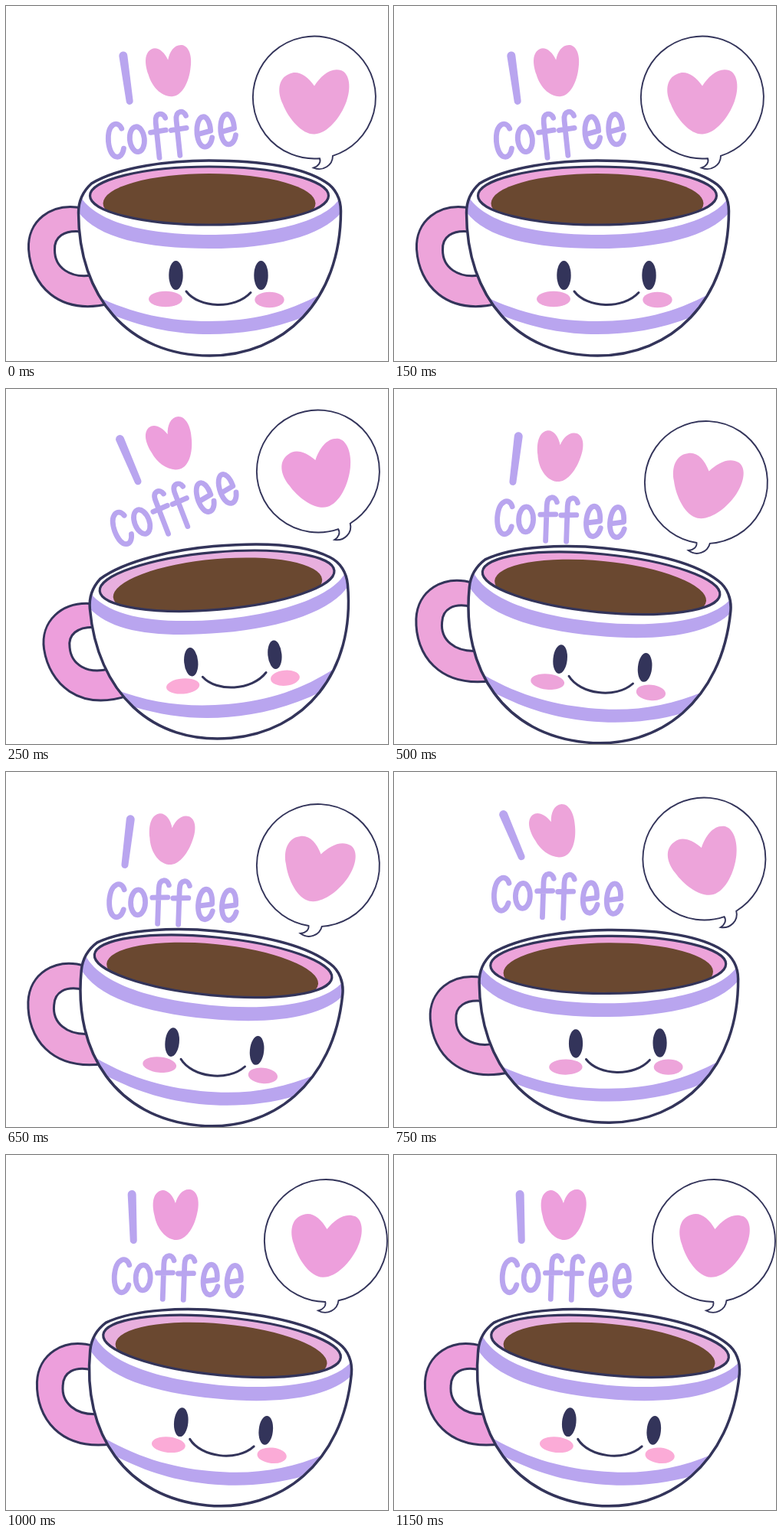
Write an HTML page that moves like this. It is 498 px wide and 464 px high and loops after 1250 ms.

```html
<!DOCTYPE html>
<html lang="en">
<head>
<meta charset="utf-8">
<title>I love coffee</title>
<style>
  html, body { margin: 0; width: 100%; height: 100%; overflow: hidden; background: #fff; }
  svg { display: block; width: 100%; height: 100%;
    --ink: #33345a; --lilac: #b9a5ef; --pink: #eda4da; --rim: #eda4da; --cheek: #eda4da; }
  svg.soft { --pink: #ed9fdc; --rim: #e8afde; --cheek: #fbabd7; }
  .ink { fill: var(--ink); }
  .pink { fill: var(--pink); }
  .lilac { fill: var(--lilac); }
  .line { stroke: var(--ink); stroke-linecap: round; }
  #word { fill: none; stroke: var(--lilac); stroke-width: 6.8; stroke-linecap: round; stroke-linejoin: round; }
</style>
</head>
<body>
<svg viewBox="0 0 498 464" role="img" aria-label="I love coffee">
  <defs>
    <path id="shell" d="M95,270 C95,256 100,243 112,232 C148,210 215,202 265,202 C320,202 383,208 417,230 C430,238 437,252 437,268 C437,386 362,457 266,457 C160,457 95,380 95,270Z"/>
    <ellipse id="mouth" cx="265.5" cy="248" rx="155.5" ry="38"/>
    <clipPath id="inShell"><use href="#shell"/></clipPath>
    <clipPath id="inMouth"><use href="#mouth"/></clipPath>
    <path id="f" d="M68,-23 C66,-31 55,-32 55,-18 L55,28 M47,-6 L67,-7"/>
    <path id="e" d="M107,3 L125,0 C126,-26 108,-26 107,2 C107,25 122,25 126,9"/>
  </defs>

  <!-- The cup is drawn upright and turns about the middle of its face. -->
  <g id="cup"><g transform="translate(-277.5 -352)">
    <path class="pink line" stroke-width="3" d="M100,264 C58,256 28,282 30,318 C33,364 68,405 136,389 L140,360 L112,352 C84,356 64,342 64,319 C63,302 76,292 100,295Z"/>
    <use href="#shell" fill="#fff"/>
    <g class="lilac" clip-path="url(#inShell)">
      <path d="M93,240 C109,282 180,299 266,299 C350,299 425,280 439,245 L439,268 C415,300 350,317 266,317 C180,317 118,303 93,267Z"/>
      <path d="M116,378 C166,403 215,412 265,412 C320,412 366,401 412,376 L390,406 C347,423 305,429 265,429 C225,429 185,422 140,404Z"/>
    </g>
    <use href="#shell" class="line" fill="none" stroke-width="3.5"/>
    <use href="#mouth" fill="var(--rim)"/>
    <ellipse cx="265.5" cy="258" rx="138.5" ry="39" fill="#6a4830" clip-path="url(#inMouth)"/>
    <use href="#mouth" class="line" fill="none" stroke-width="3.2"/>
    <ellipse class="ink" cx="222" cy="352" rx="9.2" ry="19"/>
    <ellipse class="ink" cx="333" cy="352" rx="9.2" ry="19"/>
    <ellipse cx="208.5" cy="383" rx="22" ry="10.2" fill="var(--cheek)"/>
    <ellipse cx="344" cy="384" rx="19.2" ry="10.2" fill="var(--cheek)"/>
    <path class="line" fill="none" stroke-width="3" d="M235.5,373 C252,395 299,397 319.5,374.5"/>
  </g></g>

  <g id="bubble">
    <path class="line" fill="#fff" stroke-width="1.9" d="M24,76.3 A80,80 0 1 0 7,79.7 C9,85 5,90 -1,92 C11,97 24,89 24,76.3Z"/>
    <path class="pink" transform="translate(0 -15) rotate(-2)" d="M0,0 C-9,-14 -21,-22 -32,-17 C-47,-12 -49,6 -42,22 C-35,42 -18,63 -2,63 C15,63 33,42 41,22 C48,5 47,-14 36,-19 C22,-24 9,-13 0,0Z"/>
  </g>

  <g id="lettering">
    <path id="bar" class="lilac" d="M-5.5,-30 A5.5,5.5 0 0 1 5.5,-30 L4.5,30 A4.5,4.5 0 0 1 -4.5,30Z"/>
    <g id="heart">
      <path class="pink" transform="translate(0 -17)" d="M0,0 C-4,-12 -13,-19 -20,-16 C-30,-12 -31,2 -27,17 C-24,33 -12,48 2,48 C14,48 24,33 28,15 C32,0 30,-15 20,-18 C10,-20 3,-11 0,0Z"/>
    </g>
    <g id="word"><g transform="translate(-73.5 0)">
      <path d="M10,-15 C6,-27 -8,-24 -9,0 C-9,25 6,27 10,11"/>
      <ellipse cx="28.5" cy="1" rx="9.5" ry="16.5"/>
      <use href="#f"/><use href="#f" x="27"/>
      <use href="#e"/><use href="#e" x="31"/>
    </g></g>
  </g>
</svg>
<script>
const BEAT = 250, BEATS = 5;
const svg = document.querySelector('svg');

// One key per beat; every part's pose follows from these.
const driftX = [402, 407, 407, 404.5, 417];
const driftY = [119.5, 107.5, 122, 113.5, 112];
const sway = [0, -1, 1, -1, .4];
const cupTilt = [0, -5, 5.6, -.4, 5.5];
const cupY = [352, 352, 358.5, 354.5, 354.5];
const wordTilt = [-6, -21, 2, 2, 2];

function place(id, x, y, angle = 0, size = 1) {
  document.getElementById(id).setAttribute('transform',
    `translate(${x} ${y}) rotate(${angle}) scale(${size})`);
}

function pose(k) {
  const x = driftX[k], y = driftY[k], s = sway[k], tilt = wordTilt[k];

  // The cup rocks sideways twice per loop and shrinks a little on odd beats.
  const cupX = 284 + 12.6 * Math.sin(4 * Math.PI * k / BEATS - .59);
  place('cup', cupX, cupY[k], cupTilt[k], 1 - .013 * (k % 2));

  // The lettering floats with the bubble but slowly falls behind.
  place('bubble', x, y, 14 * s);
  place('lettering', x - 186.5 - 1.7 * k, y + 49);
  place('word', 0, 0, tilt);
  place('heart', -3, -81, -4.5 + 13 * s);
  place('bar', -58.5, -78 - .7 * tilt, -8 + 15 * s);

  svg.classList.toggle('soft', k === 1 || k === 4);
}

function draw() {
  pose(Math.floor(performance.now() / BEAT) % BEATS);
  requestAnimationFrame(draw);
}
draw();
</script>
</body>
</html>
```
